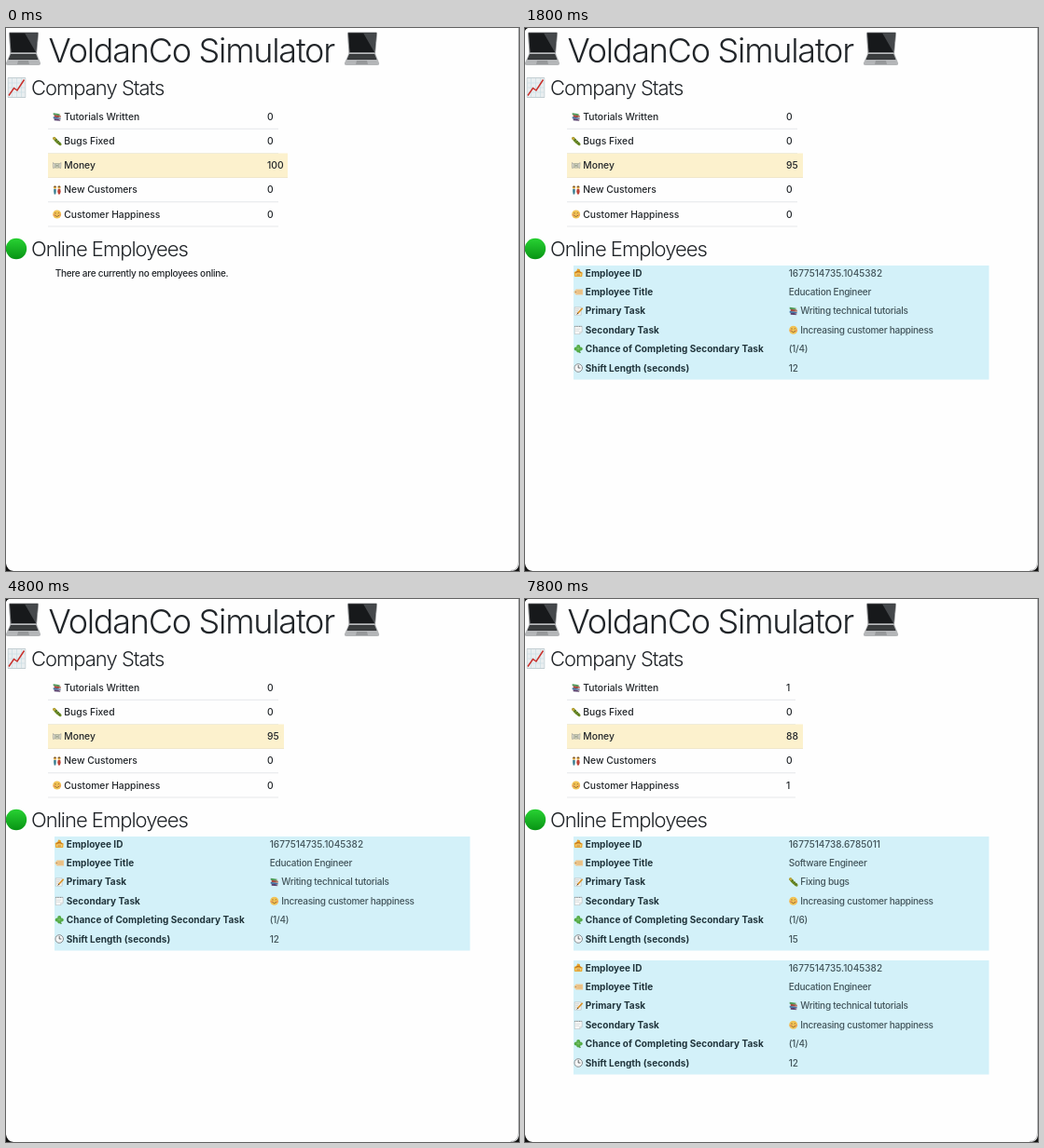
An HTML page for the animation above (8000 ms loop, 550 px wide and 583 px high).

```html
<!DOCTYPE html>
<html lang="en">
<head>
<meta charset="utf-8">
<title>VoldanCo Simulator</title>
<style>
  html, body { margin: 0; width: 100%; height: 100%; overflow: hidden; background: #fefefe; }
  svg { display: block; }
  text { font: 500 10px Inter, "Open Sans", sans-serif; font-optical-sizing: none; letter-spacing: -.025em; fill: #212529; white-space: pre; }
  .title { font-size: 36px; font-weight: 340; letter-spacing: -.035em; }
  .heading { font-size: 22px; font-weight: 340; letter-spacing: -.045em; }
  .stat { font-size: 10.3px; letter-spacing: 0; }
  .label { font-weight: 700; letter-spacing: .003em; fill: #20343b; }
  .value { fill: #42545a; }
  .digits { letter-spacing: 0; }
  .state0, .state1, .state2, .corner { visibility: hidden; animation: 8s step-end infinite; }
  .state0 { animation-name: first; }
  .state1 { animation-name: second; }
  .state2 { animation-name: third; }
  .corner { animation-name: corner; }
  @keyframes first { 0% { visibility: visible } 22.5%, 100% { visibility: hidden } }
  @keyframes second { 0% { visibility: hidden } 22.5% { visibility: visible } 62.5%, 100% { visibility: hidden } }
  @keyframes third { 0% { visibility: hidden } 62.5%, 100% { visibility: visible } }
  @keyframes corner { 0% { visibility: hidden } 17.5%, 100% { visibility: visible } }
</style>
</head>
<body>
<svg id="stage" width="550" height="583" viewBox="0 0 550 583">
  <defs>
    <linearGradient id="green" x2="0" y2="1">
      <stop offset=".1" stop-color="#25cc30"/><stop offset="1" stop-color="#089414"/>
    </linearGradient>
    <symbol id="laptop" viewBox="0 0 37 36" overflow="visible">
      <path d="M4 0H34Q35.200 0 35 1.500L33 23H4.500L3 1.500Q3 0 4 0Z" fill="#8f9193"/>
      <path d="M4 .8H34L32 21.500H5.500Z" fill="#17191b"/>
      <path d="M20 .8H34L32 21.500Z" fill="#45484b"/>
      <path d="M4.500 22.500H33L37 33Q37.500 35.500 35 35.500H2Q-.5 35.500 0 33Z" fill="#b4b6b8"/>
      <path d="M5 23.500H32.200L34.500 29.500H2.500Z" fill="#303234"/>
      <path d="M4.400 25.500H33M3.600 27.500H33.800" stroke="#5e6062" stroke-width=".5"/>
      <path d="M13 30.500H24L25 34.500H12Z" fill="#97999b"/>
    </symbol>
    <symbol id="chart" viewBox="0 0 20 22">
      <path d="M.5 .5H19.500V21.500H.5Z" fill="#e9eef0" stroke="#c3ced2"/>
      <path d="M5 1V21M10 1V21M15 1V21M1 6H19M1 11H19M1 16H19" stroke="#cbdde3" stroke-width=".7"/>
      <path d="M1.500 19.500L7 11.500L10.500 14L18 2.500" fill="none" stroke="#c9302c" stroke-width="1.500"/>
    </symbol>
    <symbol id="books" viewBox="0 0 10 10">
      <path d="M1 1L8 2V4L1 3Z" fill="#4d9b58"/>
      <path d="M2 3L9 4V6L2 5.500Z" fill="#a4483c"/>
      <path d="M1 5L9 6.500V7.500L1 7Z" fill="#4073a4"/>
      <path d="M2 7L8.500 7.500V9.500L2 9Z" fill="#58406f"/>
      <path d="M7 2.500L9 3M7 5L9 5.500M7 8L9 8.500" stroke="#ddd3bd" stroke-width=".7"/>
    </symbol>
    <symbol id="bug" viewBox="0 0 10 10">
      <path d="M2 2Q4 5 8.500 8.500" fill="none" stroke="#6f8f27" stroke-width="3" stroke-linecap="round"/>
      <path d="M3 4.500L5 3M5 6.500L7 5M7 8.500L8.500 6.500" stroke="#39551c" stroke-width=".8"/>
      <circle cx="2" cy="2" r="1.500" fill="#c2a338"/>
    </symbol>
    <symbol id="money" viewBox="0 0 10 10">
      <path d="M.5 2L3 3.500V7L1 8Z M9.500 2L7 3.500V7L9 8Z" fill="#e4e3d6" stroke="#8f9188" stroke-width=".6"/>
      <path d="M3 3H7V7.500H3Z" fill="#d8d9c4" stroke="#8d9481" stroke-width=".6"/>
      <circle cx="5" cy="5.200" r="1" fill="#8d9481"/>
    </symbol>
    <symbol id="people" viewBox="0 0 10 10">
      <path d="M1.500 4H4V7L3.500 10H2L1.500 7Z" fill="#397f91"/>
      <path d="M6 4H8.500L9 7L8 10H6.500L5.500 7Z" fill="#bd4337"/>
      <circle cx="2.800" cy="2.300" r="1.600" fill="#e4ad43"/>
      <circle cx="7.300" cy="2.300" r="1.600" fill="#e4ad43"/>
      <path d="M1.200 2Q2.800-.7 4.400 2ZM5.700 2Q7.300-.7 8.900 2Z" fill="#60432f"/>
    </symbol>
    <symbol id="smile" viewBox="0 0 10 10">
      <circle cx="5" cy="5" r="4.500" fill="#f1c355"/>
      <path d="M2.500 4Q3.200 3 4 4M6 4Q6.800 3 7.500 4M2.500 6Q5 9 7.500 6" fill="none" stroke="#855425" stroke-width=".8"/>
      <circle cx="1.900" cy="5.700" r=".9" fill="#eb9065"/><circle cx="8.100" cy="5.700" r=".9" fill="#eb9065"/>
    </symbol>
    <symbol id="badge" viewBox="0 0 10 10">
      <path d="M.5 4L3 3L4 .5L6.500 1L7 3.500L9.500 4.500L9 9H1Z" fill="#e9a52c"/>
      <path d="M2 5.500H8V8H2Z" fill="#f8db83"/>
      <path d="M2 4.500Q5 2 8 4.500M3 7H7" fill="none" stroke="#a75d20" stroke-width=".8"/>
    </symbol>
    <symbol id="tag" viewBox="0 0 10 10">
      <path d="M0 5L2.500 2H10V8H2.500Z" fill="#efc88f"/>
      <path d="M4 4H9M4 6H9" stroke="#dcae70" stroke-width=".6"/>
      <circle cx="2.300" cy="5" r=".7" fill="#a58560"/>
    </symbol>
    <symbol id="memo" viewBox="0 0 10 10">
      <path d="M1 1H8V9.500H1Z" fill="#f5f5f2" stroke="#a6aaaa" stroke-width=".5"/>
      <path d="M2 3H6M2 5H5M2 7H4" stroke="#a9b4b8" stroke-width=".6"/>
      <path d="M4 8L9.500 2" stroke="#d99227" stroke-width="1.700"/>
      <path d="M3.500 8.700L4.700 7.200" stroke="#53463c"/>
    </symbol>
    <symbol id="pad" viewBox="0 0 10 10">
      <path d="M1 1H9V7L6.500 9.500H1Z" fill="#f8f8f7" stroke="#a4abad" stroke-width=".5"/>
      <path d="M1 1.200H9" stroke="#858a8c" stroke-dasharray="1 .6"/>
      <path d="M2 4H7M2 6H6M6.500 9.500V7H9" fill="none" stroke="#b7bec0" stroke-width=".5"/>
    </symbol>
    <symbol id="clover" viewBox="0 0 10 10">
      <path d="M5 5L7 9.500" stroke="#3a822d" stroke-width="1.200"/>
      <g fill="#51a943"><circle cx="5" cy="2.500" r="2"/><circle cx="2.500" cy="5" r="2"/><circle cx="7.500" cy="5" r="2"/><circle cx="5" cy="7" r="2"/></g>
      <path d="M5 2V7M2.500 5H7.500" stroke="#8ccb73" stroke-width=".5"/>
    </symbol>
    <symbol id="clock" viewBox="0 0 10 10">
      <circle cx="5" cy="5" r="4.300" fill="#f5f6f6" stroke="#858b8e"/>
      <path d="M5 2V5H7.200" fill="none" stroke="#42484c" stroke-width=".8"/>
    </symbol>
  </defs>
  <rect width="550" height="583" fill="#fefefe"/>
  <path d="M549.500 0V573Q549.500 582.500 541 582.500" fill="none" stroke="#b4b5b7"/>
  <path d="M0 575Q1 582 8 583H0ZM550 576Q549 582 543 583H550Z" fill="#111"/>
  <path class="corner" d="M0 0H3Q.8 .8 0 3Z" fill="#111"/>
  <use href="#laptop" x="0" y="4.500" width="37" height="36"/>
  <use href="#laptop" x="363" y="4.500" width="37" height="36"/>
  <text class="title" x="45.500" y="37">VoldanCo</text>
  <text class="title" x="206.500" y="37">Simulator</text>
  <use href="#chart" x="1.500" y="53" width="20" height="22"/>
  <text class="heading" x="27" y="72">Company Stats</text>
  <circle cx="11" cy="237" r="11.200" fill="url(#green)"/>
  <text class="heading" x="27" y="245">Online Employees</text>
</svg>
<script>
const stats = [
  ['books', 'Tutorials Written'], ['bug', 'Bugs Fixed'], ['money', 'Money'],
  ['people', 'New Customers'], ['smile', 'Customer Happiness']
];
const fields = [
  ['badge', 'Employee ID'], ['tag', 'Employee Title'], ['memo', 'Primary Task'],
  ['pad', 'Secondary Task'], ['clover', 'Chance of Completing Secondary Task'],
  ['clock', 'Shift Length (seconds)']
];
const happiness = ['smile', 'Increasing customer happiness'];
const educator = ['1677514735.1045382', 'Education Engineer', ['books', 'Writing technical tutorials'], happiness, '(1/4)', '12'];
const developer = ['1677514738.6785011', 'Software Engineer', ['bug', 'Fixing bugs'], happiness, '(1/6)', '15'];
const states = [
  { totals: [0, 0, 100, 0, 0], lineEnd: 292, moneyEnd: 302, staff: [] },
  { totals: [0, 0, 95, 0, 0], lineEnd: 292, moneyEnd: 298, staff: [educator] },
  { totals: [1, 0, 88, 0, 1], lineEnd: 290, moneyEnd: 298, staff: [developer, educator] }
];

const text = (x, mid, content, kind = '') => {
  const digits = /^[\d.]+$/.test(content) ? 'digits' : '';
  return `<text class="${kind} ${digits}" x="${x}" y="${mid + 3.6}">${content}</text>`;
};
const iconText = (x, mid, [icon, content], kind) =>
  `<use href="#${icon}" x="${x}" y="${mid - 5}" width="10" height="10"/>` + text(x + 12.6, mid, content, kind);
const box = (x, y, right, height, fill) =>
  `<rect x="${x}" y="${y}" width="${right - x}" height="${height}" fill="${fill}"/>`;

function statRow(state, stat, i) {
  const mid = 95.2 + i * 26.2;
  const money = i === 2;
  return (money ? box(45, 134.5, state.moneyEnd, 26.5, '#fcf1cd') : '')
    + box(45, mid + 12.6, money ? state.moneyEnd : state.lineEnd, .8, money ? '#eee5cb' : '#dee1e4')
    + iconText(49.7, mid, stat, 'stat') + text(280, mid, String(state.totals[i]), 'stat');
}

function employeeCard(values, index) {
  const top = 255 + index * 133;
  return box(52, top, 497.5, 122.5, '#d3f1f9') + fields.map((field, i) => {
    const mid = top + 8 + i * 20.4;
    const value = values[i];
    return iconText(52.2, mid, field, 'label')
      + (Array.isArray(value) ? iconText(282.7, mid, value, 'value') : text(282.7, mid, value, 'value'));
  }).join('');
}

document.getElementById('stage').insertAdjacentHTML('beforeend', states.map((state, i) =>
  `<g class="state${i}">`
  + stats.map((stat, row) => statRow(state, stat, row)).join('')
  + (state.staff.map(employeeCard).join('') || text(52.7, 263, 'There are currently no employees online.'))
  + '</g>').join(''));
</script>
</body>
</html>
```
